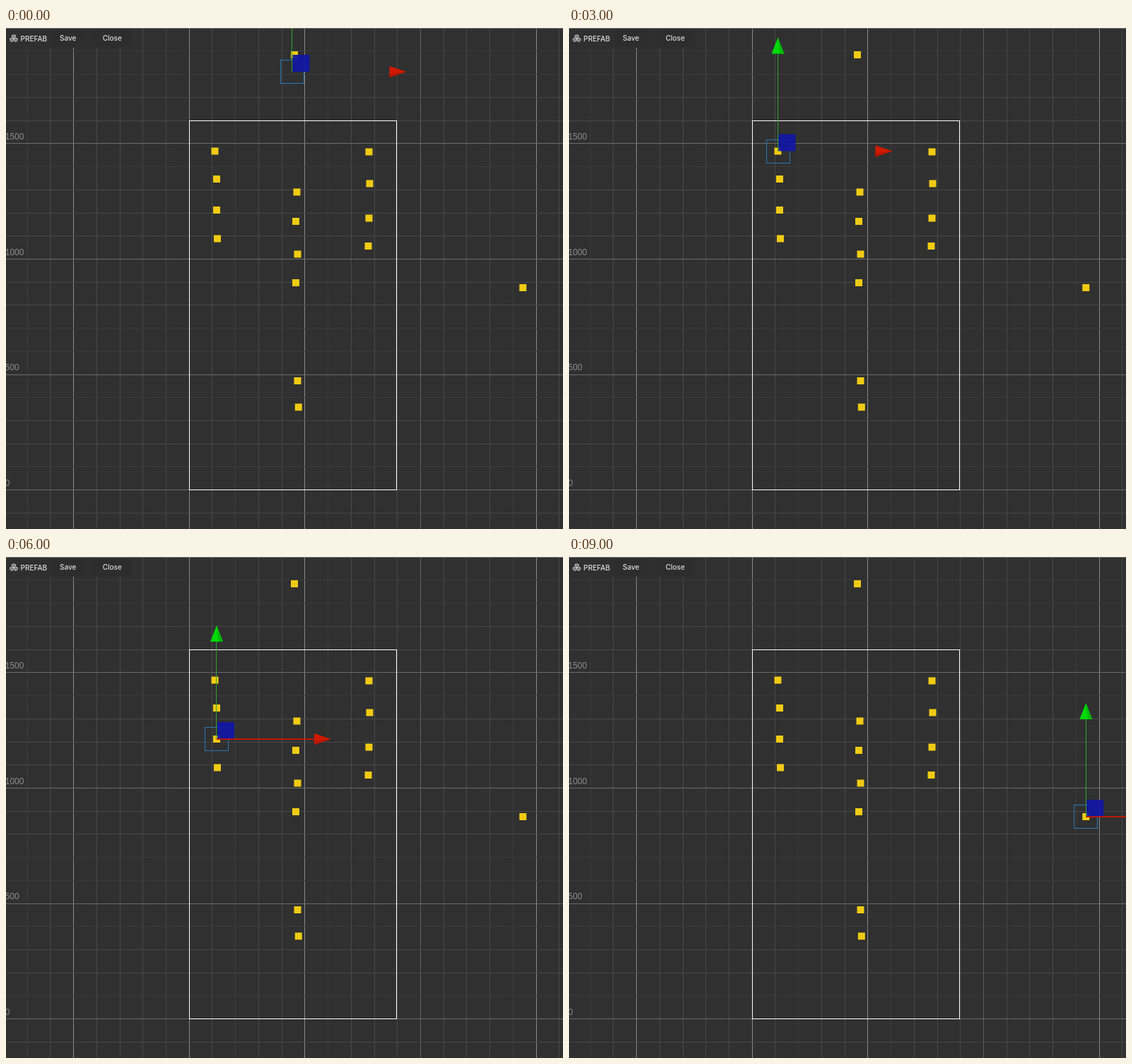
Recreate the animation shown at these times as an HTML page. Size 788x710 px, loop 10 s.

```html
<!DOCTYPE html>
<html lang="en">
<head>
<meta charset="utf-8">
<title>Prefab editor</title>
<style>
  html, body { margin: 0; width: 100%; height: 100%; overflow: hidden; background: #303030; }
  svg { display: block; }
  .crisp { shape-rendering: crispEdges; }
  .scale { font: 12px "Liberation Sans", sans-serif; fill: #8c8c8c; }
  .menu { font: 500 10px Inter, sans-serif; fill: #dedede; }
</style>
</head>
<body>
<svg width="788" height="710" viewBox="0 0 788 710">
  <rect width="788" height="710" fill="#303030"/>
  <g id="grid" class="crisp"></g>
  <rect class="crisp" x="259.5" y="131.5" width="293" height="523" fill="none" stroke="#fff"/>
  <g id="labels" class="scale"></g>
  <g id="points" fill="#f0cb14"></g>
  <g id="gizmo">
    <rect class="crisp" x="-16.5" y="-16.5" width="33" height="33" fill="none" stroke="#2878b8"/>
    <rect x="1" y="-24" width="24" height="24" fill="#1317a2" fill-opacity=".94"/>
    <rect id="shaft" x="0" y="-.7" width="139" height="1.7" fill="#d01800"/>
    <path d="M138 -8L162 0L138 8Z" fill="#d01a00"/>
    <path d="M138 3L162 0L138 8Z" fill="#b81600"/>
    <rect class="crisp" x="-.7" y="-138" width="1" height="138" fill="#2fa42f"/>
    <path d="M-9 -138L0 -161L9 -138Z" fill="#00d808"/>
    <path d="M3 -138L0 -161L9 -138Z" fill="#00b808"/>
  </g>
  <g id="menu">
    <rect width="180" height="27" y="1" fill="#2f2f2f"/>
    <rect x="64" y="2" width="48" height="25" fill="#2d2d2d"/>
    <rect x="124" y="2" width="53" height="25" fill="#2d2d2d"/>
    <g id="cubes" fill="#303030" stroke="#d8d8d8" stroke-width=".9" stroke-linejoin="round"></g>
    <g class="menu">
      <text x="20.5" y="18.5">PREFAB</text>
      <text x="76" y="18">Save</text>
      <text x="136.7" y="18">Close</text>
    </g>
  </g>
</svg>
<script>
const NS = "http://www.w3.org/2000/svg";
const $ = id => document.getElementById(id);

function add(parent, tag, attrs, text) {
  const el = document.createElementNS(NS, tag);
  for (const k in attrs) el.setAttribute(k, attrs[k]);
  if (text) el.textContent = text;
  $(parent).appendChild(el);
}

// Grid: every fifth line is a major one
const CELL = 32.72, X0 = 95.65, Y0 = 654.65;
const faintCols = [-2, 7, 11, 19], faintRows = [1, 4, 6, 7, 14, 18, 19];

function shade(i, faint, major) {
  if (i % 5 === 0) return major;
  return faint.includes(i) ? "#3b3b3b" : "#484848";
}
for (let i = -2; i <= 21; i++) {
  const major = i === 15 ? "#606060" : "#8a8a8a";
  add("grid", "rect", { x: Math.floor(X0 + i * CELL), y: 0, width: 1, height: 710, fill: shade(i, faintCols, major) });
}
for (let i = -1; i <= 20; i++) {
  add("grid", "rect", { x: 0, y: Math.floor(Y0 - i * CELL), width: 788, height: 1, fill: shade(i, faintRows, "#6c6c6c") });
}
for (let i = 0; i < 4; i++) {
  add("labels", "text", { x: -1.3, y: 649 - i * 163.6 }, String(i * 500));
}

for (const [x, y] of [[11, 9.5], [8.3, 14], [13.7, 14]]) {
  add("cubes", "path", {
    d: `M${x} ${y}l2.5 1.2v2.8l-2.5 1.3l-2.5 -1.3v-2.8zm-2.5 1.2l2.5 1.2l2.5 -1.2m-2.5 1.2v2.9`
  });
}

// Spawn points
const P = {
  top: [408, 38], far: [731.3, 368],
  l1: [295.5, 174.5], l2: [298, 214], l3: [298, 258], l4: [299, 298.5],
  c1: [411.5, 232.5], c2: [410, 274], c3: [412.5, 320.5], c4: [410, 361],
  r1: [513.5, 175.5], r2: [514.5, 220.5], r3: [513.5, 269.5], r4: [512.5, 309],
  b1: [412.5, 500], b2: [413.8, 537.3]
};
for (const [x, y] of Object.values(P)) {
  add("points", "rect", { x: x - 5, y: y - 5, width: 10, height: 10 });
}
P.root = [404.5, 62];

// What is selected in each half second
const STEP = 500, LOOP = 10000;
const order = "root root root c2 c2 r1 l1 c3 r2 l2 b1 r3 l3 c1 b2 r4 l4 c4 far far".split(" ");
const bare = [0, 6]; // steps with no red shaft

function draw(t) {
  const i = Math.floor((t % LOOP) / STEP);
  const [x, y] = P[order[i]];
  $("gizmo").setAttribute("transform", `translate(${x} ${y})`);
  $("shaft").setAttribute("visibility", bare.includes(i) ? "hidden" : "visible");
}

const start = performance.now();
function tick() {
  draw(performance.now() - start);
  requestAnimationFrame(tick);
}
draw(0);
requestAnimationFrame(tick);
</script>
</body>
</html>
```
